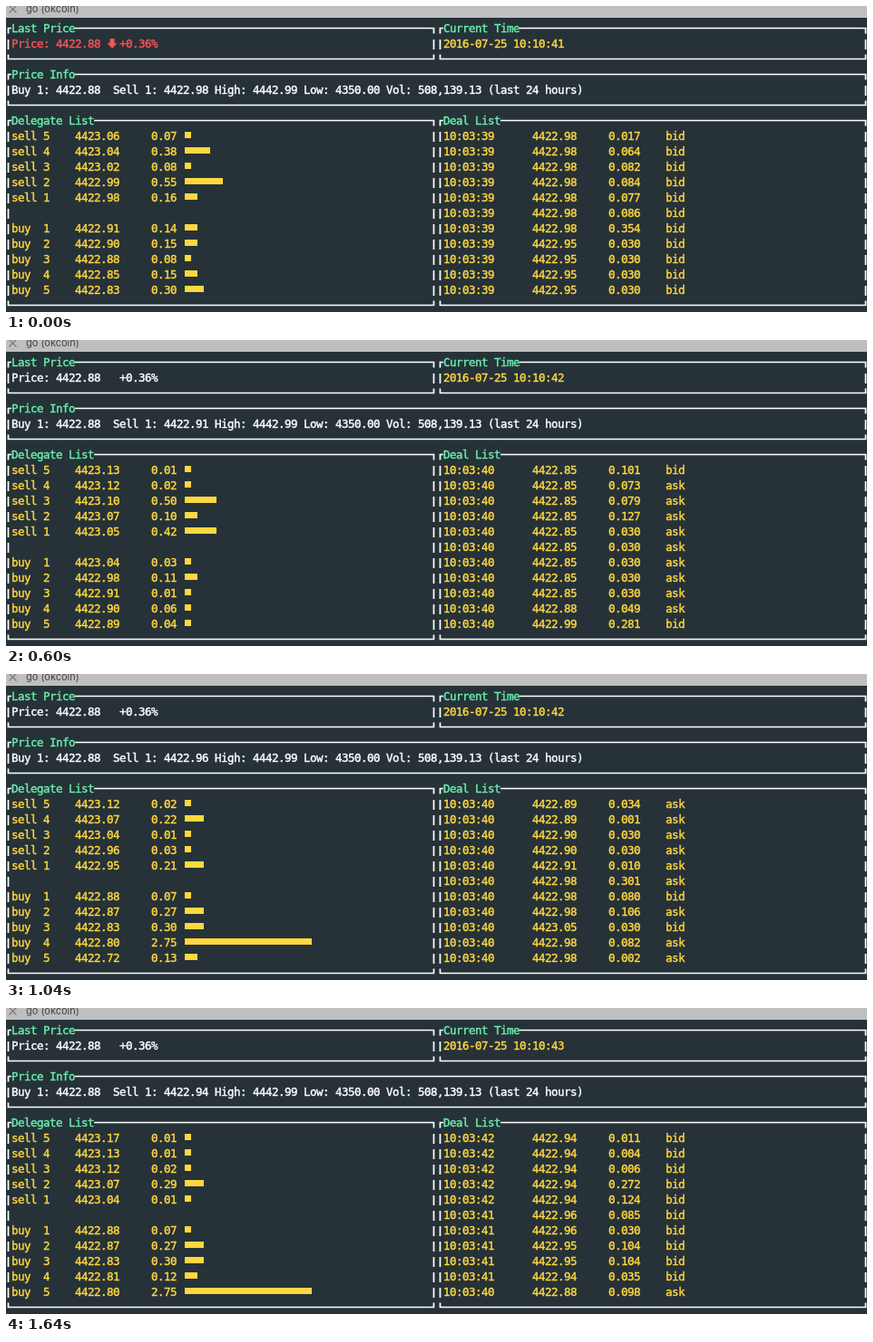
Recreate the animation shown at these times as an HTML page. Size 949x338 px, loop 1790 ms.

```html
<!DOCTYPE html>
<html lang="en">
<head>
<meta charset="utf-8">
<title>Ticker</title>
<style>
  html, body { margin: 0; width: 100%; height: 100%; overflow: hidden; background: #263238; }
  #stage { position: absolute; left: 0; top: 0; width: 949px; height: 338px; overflow: hidden; }
  #tab { position: absolute; inset: 0 0 auto; height: 13px; background: #bfbfbf; }
  #tab span { position: absolute; left: 22px; top: -4px; font: 11px/14px Inter, sans-serif; color: #444; white-space: pre; }
  svg { position: absolute; left: 0; top: 0; }
  /* Every glyph sits on a 7px terminal grid. */
  .line {
    position: absolute; white-space: pre; color: #ffd740;
    font: 12.5px/17px "DejaVu Sans Mono", monospace;
    letter-spacing: calc(7px - 1ch);
    -webkit-text-stroke: .4px currentColor;
  }
  .title { color: #69f0ae; }
  .white { color: #fff; }
  .red { color: #ff5252; }
  .bar { position: absolute; left: 197px; height: 7px; background: #ffd740; }
  .cue { animation: 1790ms step-end infinite; }
</style>
</head>
<body>
<div id="stage">
  <div id="tab"><span>go (okcoin)</span></div>
  <svg width="949" height="338" fill="none">
    <path d="M3.5 -.5L11.5 7.5M11.5 -.5L3.5 7.5" stroke="#7d7d7d" stroke-width="1.4"/>
    <path id="frames" stroke="#fff" stroke-width="1.7"/>
  </svg>
</div>
<script>
const LOOP = 1790, CELL = 7, ROW = 17;
const stage = document.getElementById('stage');
const sheet = document.head.appendChild(document.createElement('style'));
const colX = col => col * CELL - 1;
const rowY = row => 24.5 + row * ROW;

function add(parent, className, style, text = '') {
  const el = document.createElement('div');
  el.className = className;
  Object.assign(el.style, style);
  el.textContent = text;
  return parent.appendChild(el);
}

const write = (parent, col, row, text, tone = '') =>
  add(parent, `line ${tone}`, { left: `${colX(col)}px`, top: `${16 + row * ROW}px` }, text);

// A layer that is visible only between two times of the loop.
function during(from, to) {
  const name = `from${from}to${to}`;
  const pct = ms => `${ms / LOOP * 100}%`;
  sheet.textContent += `@keyframes ${name} {
    0% { visibility: ${from ? 'hidden' : 'visible'} }
    ${pct(from)} { visibility: visible }
    ${pct(to)} { visibility: hidden }
  }`;
  return add(stage, 'cue', { animationName: name });
}

let outline = '';
function box(left, right, top, bottom, title) {
  const x1 = colX(left) + 3.5, x2 = colX(right) + 3.5;
  const y1 = rowY(top), y2 = rowY(bottom);
  outline += `M${x1} ${y1 + 6}V${y1}H${colX(left + 1)}`
    + `M${colX(left + 1 + title.length)} ${y1}H${x2}V${y1 + 6}`
    + `M${x1} ${y2 - 5}V${y2}H${x2}V${y2 - 5}`;
  for (let row = top + 1; row < bottom; row++)
    for (const x of [x1, x2]) outline += `M${x} ${rowY(row) - 4.5}v11`;
  write(stage, left + 1, top, title, 'title');
}

box(0, 67, 0, 2, 'Last Price');
box(68, 135, 0, 2, 'Current Time');
box(0, 135, 3, 5, 'Price Info');
box(0, 67, 6, 18, 'Delegate List');
box(68, 135, 6, 18, 'Deal List');
document.getElementById('frames').setAttribute('d', outline);

// Last price
const falling = during(0, 450);
write(falling, 1, 1, 'Price: 4422.88   +0.36%', 'red');
falling.insertAdjacentHTML('beforeend',
  '<svg width="130" height="50"><path d="M114.5 36h5v5h3l-5.5 6-5.5-6h3z" fill="#ff5252"/></svg>');
write(during(450, LOOP), 1, 1, 'Price: 4422.88   +0.36%', 'white');

// Clock
[[0, 600], [600, 1640], [1640, LOOP]].forEach(([from, to], i) =>
  write(during(from, to), 69, 1, `2016-07-25 10:10:${41 + i}`));

// Order book: best selling price, then price and amount from sell 5 to buy 5
function book(from, to, sell, orders) {
  const layer = during(from, to);
  write(layer, 1, 4, `Buy 1: 4422.88  Sell 1: ${sell} High: 4442.99 Low: 4350.00 Vol: 508,139.13 (last 24 hours)`, 'white');
  orders.split(', ').forEach((order, i) => {
    const [price, amount] = order.split(' ').map(Number);
    const label = i < 5 ? `sell ${5 - i}` : `buy  ${i - 4}`;
    const row = i < 5 ? 7 + i : 8 + i;
    write(layer, 1, row, `${label}    ${price.toFixed(2)}     ${amount.toFixed(2)}`);
    const blocks = Math.min(20, Math.ceil(amount * 10));
    add(layer, 'bar', { top: `${rowY(row) - 4.5}px`, width: `${blocks * CELL}px` });
  });
}

book(0, 450, '4422.98',
  '4423.06 .07, 4423.04 .38, 4423.02 .08, 4422.99 .55, 4422.98 .16, ' +
  '4422.91 .14, 4422.90 .15, 4422.88 .08, 4422.85 .15, 4422.83 .30');
book(450, 1040, '4422.91',
  '4423.13 .01, 4423.12 .02, 4423.10 .50, 4423.07 .101, 4423.05 .42, ' +
  '4423.04 .03, 4422.98 .11, 4422.91 .01, 4422.90 .06, 4422.89 .04');
book(1040, 1640, '4422.96',
  '4423.12 .02, 4423.07 .22, 4423.04 .01, 4422.96 .03, 4422.95 .21, ' +
  '4422.88 .07, 4422.87 .27, 4422.83 .30, 4422.80 2.75, 4422.72 .13');
book(1640, LOOP, '4422.94',
  '4423.17 .01, 4423.13 .01, 4423.12 .02, 4423.07 .29, 4423.04 .01, ' +
  '4422.88 .07, 4422.87 .27, 4422.83 .30, 4422.81 .12, 4422.80 2.75');

// Deals: a run shares second, price and side; amounts are newest first
const run = (second, price, side, amounts) => amounts.split(' ').map(amount =>
  `10:03:${second}      ${price}     0.${amount}    ${side}`);

function deals(from, to, lines) {
  const layer = during(from, to);
  lines.slice(0, 11).forEach((line, i) => write(layer, 69, 7 + i, line));
}

deals(0, 450, [
  ...run(39, '4422.98', 'bid', '017 064 082 084 077 086 354'),
  ...run(39, '4422.95', 'bid', '030 030 030 030'),
]);
deals(450, 1040, [
  ...run(40, '4422.85', 'bid', '101'),
  ...run(40, '4422.85', 'ask', '073 079 127 030 030 030 030 030'),
  ...run(40, '4422.88', 'ask', '049'),
  ...run(40, '4422.99', 'bid', '281'),
]);

const tape = [
  ...run(42, '4422.94', 'bid', '011 004 006 272 124'),
  ...run(41, '4422.96', 'bid', '085 030'),
  ...run(41, '4422.95', 'bid', '104 104'),
  ...run(41, '4422.94', 'bid', '035'),
  ...run(40, '4422.88', 'ask', '098 088 003 023 037'),
  ...run(40, '4422.89', 'ask', '034 001'),
  ...run(40, '4422.90', 'ask', '030 030'),
  ...run(40, '4422.91', 'ask', '010'),
  ...run(40, '4422.98', 'ask', '301'),
  ...run(40, '4422.98', 'bid', '080'),
  ...run(40, '4422.98', 'ask', '106'),
  ...run(40, '4423.05', 'bid', '030'),
  ...run(40, '4422.98', 'ask', '082 002'),
];
deals(1040, 1190, tape.slice(15));
deals(1190, 1640, tape.slice(10));
deals(1640, LOOP, tape);
</script>
</body>
</html>
```
